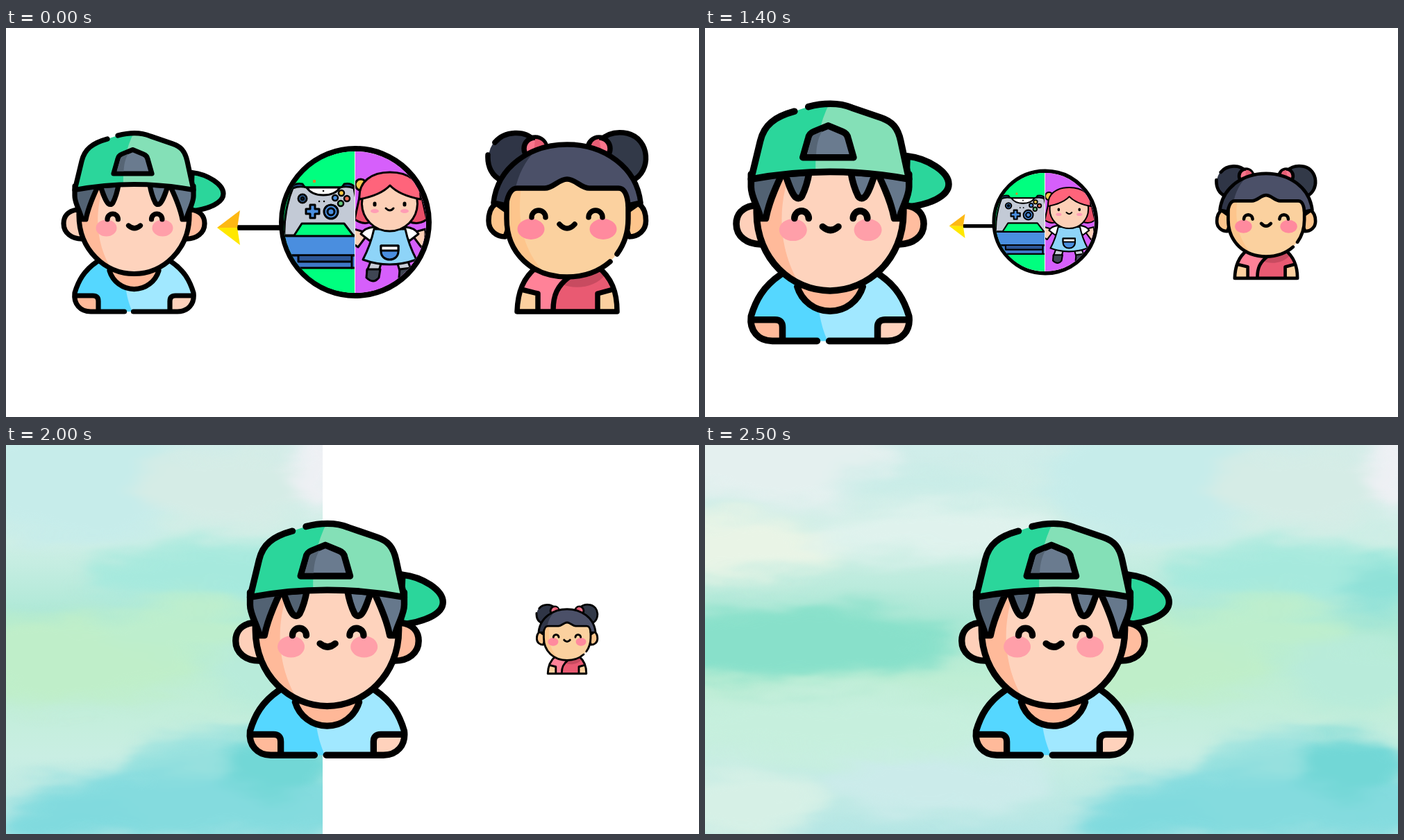
These frames come from a looping animation (998 by 561 pixels, 3 s). An HTML page:

```html
<!DOCTYPE html>
<html lang="en">
<head>
<meta charset="utf-8">
<title>Toy choice</title>
<style>
  html, body { margin: 0; height: 100%; overflow: hidden; background: #fff; }
  svg { display: block; width: 100vw; height: 100vh; }
  .art { stroke: #000; stroke-linecap: round; stroke-linejoin: round; }
  .flat { stroke: none; }
  .line { fill: none; }
</style>
</head>
<body>
<svg viewBox="0 0 998 561">
  <defs>
    <linearGradient id="wash" x2="0" y2="1">
      <stop offset="0" stop-color="#d0edea"/>
      <stop offset=".25" stop-color="#cfefe6"/>
      <stop offset=".45" stop-color="#abe8d5"/>
      <stop offset=".6" stop-color="#beeed4"/>
      <stop offset=".8" stop-color="#c9eee3"/>
      <stop offset="1" stop-color="#b4e6e5"/>
    </linearGradient>
    <filter id="watery" filterUnits="userSpaceOnUse" x="-80" y="-80" width="1158" height="721" color-interpolation-filters="sRGB">
      <feGaussianBlur stdDeviation="13" result="soft"/>
      <feTurbulence type="fractalNoise" baseFrequency=".008 .025" numOctaves="3" seed="4"/>
      <feDisplacementMap in="soft" scale="50" xChannelSelector="R" yChannelSelector="G"/>
    </filter>
    <clipPath id="stage"><path d="M0 0H998V561H0Z"/></clipPath>
    <clipPath id="boyFace"><path d="M105 228V270C105 320 143 354.500 184.500 354.500S264 320 264 270V228Z"/></clipPath>
    <clipPath id="girlFace"><path d="M721 212V275C721 325 758 359 808 359S896 325 896 275V212Z"/></clipPath>
    <clipPath id="girlHair"><path d="M702 252C708 200 755 168 808 168S908 200 914 252L896 256Q894 231 882 231H840C828 231 820 218 808 218S788 231 776 231H736Q724 231 720 256Z"/></clipPath>
    <clipPath id="leftHalf"><path d="M502 178A102 102 0 0 0 502 382Z"/></clipPath>
    <clipPath id="rightHalf"><path d="M503 178A102 102 0 0 1 503 382Z"/></clipPath>
  </defs>

  <g id="girl" class="art" stroke-width="7.500">
    <path id="girlEar" fill="#fdc58c" d="M706 253C698 258 695 268 695 278C695 292 706 301 719 301L730 270Z"/>
    <use href="#girlEar" transform="matrix(-1 0 0 1 1616.500 0)"/>
    <circle class="flat" fill="#2f3546" cx="731" cy="187" r="36"/>
    <path class="line" d="M704 165C718 148 748 147 760 162M694 183C693 200 700 214 714 220"/>
    <path fill="#323948" d="M902 220C930 207 928 160 895 152C880 149 866 152 856 162L870 200Z"/>
    <g fill="#f9758c">
      <circle cx="762" cy="174" r="16"/>
      <circle cx="854" cy="174" r="16"/>
    </g>
    <path class="flat" fill="#e75e75" d="M762 160C774 160 778 170 776 176L760 180ZM854 160C842 162 842 170 843 180H858Z"/>
    <path class="flat" fill="#fcd09f" d="M765 344C745 360 737 380 736 409H880C880 380 872 360 852 344Z"/>
    <path class="flat" fill="#ff8298" d="M765 344C751 354 744 364 741 376L766 383V409H790C789 385 793 372 812 358Z"/>
    <path class="flat" fill="#e95a72" d="M812 358C793 372 788 385 788 409H852V383L875 376C870 360 864 352 852 344Z"/>
    <path class="flat" fill="#c84b60" d="M798 369C820 378 848 375 864 355L850 344L812 355Z"/>
    <path class="line" d="M765 344C745 360 737 380 736 409H880C880 380 872 360 852 344M742 377L766 383V407M874 377L852 383V407M811 359C794 372 788 385 788 407"/>
    <g class="flat" clip-path="url(#girlFace)">
      <path fill="#fbd19f" d="M715 210H900V365H715Z"/>
      <path fill="#fdc58c" d="M715 220H743C736 270 738 318 786 365H715Z"/>
    </g>
    <path class="line" d="M721 250V275C721 325 758 359 808 359C832 359 854 351 870 337M896 250V275C896 294 891 311 880 326"/>
    <g class="flat" clip-path="url(#girlHair)">
      <path fill="#4b5068" d="M700 160H920V260H700Z"/>
      <path fill="#303648" d="M700 160H784C757 176 739 202 733 235L722 260H700Z"/>
    </g>
    <path class="line" d="M702 252C708 200 755 168 808 168S908 200 914 252L896 256Q894 231 882 231H840C828 231 820 218 808 218S788 231 776 231H736Q724 231 720 256Z"/>
    <g class="flat" fill="#ff8a9e">
      <ellipse cx="756" cy="290" rx="19.500" ry="15"/>
      <ellipse cx="860" cy="290" rx="19.500" ry="15"/>
    </g>
    <path class="line" d="M757 273a10 10 0 0 1 20 0M839 273a10 10 0 0 1 20 0M797 283Q808 295 819 283"/>
  </g>

  <g id="toys" class="art" stroke-width="3">
    <path d="M334 288H396" stroke-width="7.500"/>
    <path class="flat" fill="#fdb813" d="M304 288L337 263L333 288.500Z"/>
    <path class="flat" fill="#ffe800" d="M304 288L337 313L333 288Z"/>
    <circle cx="503" cy="280" r="106" fill="#fff" stroke-width="8"/>
    <g clip-path="url(#leftHalf)">
      <path class="flat" fill="#00ff7f" d="M395 170H502V390H395Z"/>
      <path class="flat" fill="#d8862a" d="M442 219h4v4h-4z"/>
      <path fill="#4a8edf" d="M395 300H510V328H395Z"/>
      <path fill="#3f78c8" d="M395 328H510V346H395Z"/>
      <path fill="#2d5697" d="M421 329V337H498V329M498 337V346"/>
      <path fill="#2f5da8" d="M408 238Q411 222 427 225L432 232ZM482 232L487 225Q502 222 506 238Z"/>
      <path fill="#c3cad6" d="M413 231Q423 227 433 230H481Q491 227 501 231L514 299H500L487 282H426L415 299H401C400 277 405 250 413 231Z"/>
      <path fill="#fff" d="M433 230H481Q474 241 457 241T433 230Z"/>
      <g fill="#4a8edf">
        <circle cx="427" cy="246" r="6"/><circle cx="427" cy="246" r="2"/>
        <path d="M438 255h7v6h6v7h-6v6h-7v-6h-6v-7h6z"/>
        <circle cx="468" cy="265" r="10"/><circle cx="468" cy="265" r="5"/>
      </g>
      <g stroke-width="2.500">
        <circle cx="483" cy="238" r="4" fill="#f8c943"/>
        <circle cx="474" cy="245" r="4" fill="#4a8edf"/>
        <circle cx="491" cy="246" r="4" fill="#e96b57"/>
        <circle cx="482" cy="253" r="4" fill="#64c67a"/>
        <path d="M451 250h.1M458 250h.1M457 235h.1"/>
      </g>
    </g>
    <g clip-path="url(#rightHalf)">
      <path class="flat" fill="#d65ffb" d="M503 170H615V390H503Z"/>
      <circle cx="511" cy="226" r="8" fill="#f8c94d"/>
      <path fill="#e94f68" d="M509 244L502 276Q516 285 526 279H580Q594 285 606 276L598 240Z"/>
      <path fill="#c9ced8" d="M525 337L520 350H537L541 337ZM563 337L567 350H584L579 337Z"/>
      <path fill="#3f4653" d="M520 348L519 360Q529 370 537 360L539 348ZM567 348L566 360Q580 368 592 357L583 346Z"/>
      <g fill="#fdd0b7">
        <path id="dollHand" d="M512 293L501 290V312L507 316L519 300Z"/>
        <use href="#dollHand" transform="matrix(-1 0 0 1 1105 0)"/>
      </g>
      <path fill="#fff" d="M530 287Q516 288 511 297L524 307L535 295ZM575 287Q589 288 594 297L581 307L570 295Z"/>
      <path fill="#8ed4f8" d="M530 290H575Q580 313 591 334Q552 348 514 334Q525 313 530 290Z"/>
      <path fill="#4a8edf" d="M540 314H565V322C565 338 540 338 540 322Z"/>
      <path fill="#fff" d="M540 314H565V321H540Z"/>
      <circle cx="552.500" cy="253" r="40" fill="#fdd0b7"/>
      <path fill="#ff647b" d="M509 247C507 221 527 208 553 208S599 221 597 247Q566 241 553 227Q540 241 509 247Z"/>
      <g class="flat" fill="#ff9db5"><ellipse cx="531" cy="264" rx="6" ry="3"/><ellipse cx="574" cy="264" rx="6" ry="3"/></g>
      <path d="M531 253v2M574 253v2" stroke-width="5"/>
      <path class="line" d="M547 260Q553 266 558 260"/>
    </g>
  </g>

  <g id="backdrop" clip-path="url(#stage)">
    <path fill="url(#wash)" d="M0 0H998V561H0Z"/>
    <g id="blots" filter="url(#watery)"></g>
  </g>

  <g id="boy" class="art" stroke-width="7.200">
    <path fill="#2bd69b" d="M268 208.500C291 211 313 226 313 239C313 252 292 261.500 266 264Z"/>
    <path id="boyEar" fill="#fed0ba" d="M102 262C89 264 83 272 83 282C83 295 94 305 112 304L116 270Z"/>
    <path fill="#ffbd9f" transform="matrix(-1 0 0 1 369 0)" d="M102 262C89 264 83 272 83 282C83 295 94 305 112 304L116 270Z"/>
    <path class="flat" fill="#55d7ff" d="M131 337C112 350 104 365 99 382C97 398 107 409 122 409H200V337Z"/>
    <path class="flat" fill="#a1e8ff" d="M170 337C170 370 174 392 182 409H247C262 409 272 398 270 382C265 365 257 350 238 337Z"/>
    <path class="flat" fill="#ffba9a" d="M99 386H125Q133 386 133 394V409H122C107 409 97 400 99 386Z"/>
    <path class="flat" fill="#ffd2bc" d="M270 386H244Q236 386 236 394V409H247C262 409 272 400 270 386Z"/>
    <g class="line">
      <path d="M131 337C112 350 104 365 99 382C97 398 107 409 122 409H170.500M99 386H125Q133 386 133 394V409"/>
      <path d="M238 337C257 350 265 365 270 382C272 398 262 409 247 409H183.500M270 386H244Q236 386 236 394V409"/>
    </g>
    <path fill="#ffb898" d="M149 350A37 37 0 0 0 220 350"/>
    <g class="flat" clip-path="url(#boyFace)">
      <path fill="#fed3bd" d="M100 225H270V360H100Z"/>
      <path fill="#ffba9a" d="M100 225H142C126 265 128 318 160 360H100Z"/>
    </g>
    <path class="line" d="M105 240V270C105 320 143 354.500 184.500 354.500S264 320 264 270V240"/>
    <g id="locks">
      <path d="M99 228V242C99 253 106 262 109.500 276H115C118 260 124 246 132 229Z"/>
      <path d="M136 228C140 240 143 249 147 253Q151 256 154 252C158 244 160 238 162 226Z"/>
    </g>
    <path class="flat" fill="#2bd69b" d="M146 160C124 166 113 175 109 192L99 233.500Q184.500 217.500 270 233.500L200 152Q176 151 161 155Z"/>
    <path class="flat" fill="#84e0b7" d="M184 151C172 175 168 200 169 226Q220 224 270 233.500L261 192C258 178 252 171 240 167L208 156C200 152 192 151 184 151Z"/>
    <path class="line" d="M146 160C124 166 113 175 109 192L99 233.500Q184.500 217.500 270 233.500L261 192C258 178 252 171 240 167L208 156C194 150 176 151 161 155"/>
    <path fill="#6a7b8f" d="M155 210L161 189Q162 184 167 182L182.500 175.500L198 182Q203 184 204 189L210 210Z"/>
    <path class="flat" fill="#566575" d="M159.500 206.500L164.500 189Q165 186 168 185L176 181.500C171 190 170 198 169.500 206.500Z"/>
    <g class="flat" fill="#ff9fa9">
      <ellipse cx="144.500" cy="288.500" rx="15" ry="12"/>
      <ellipse cx="225.500" cy="288.500" rx="15" ry="12"/>
    </g>
    <path class="line" d="M146 276a7.700 8 0 0 1 15.400 0M209.500 276a7.700 8 0 0 1 15.400 0M176.500 285Q185 292.500 193.500 285"/>
  </g>
</svg>
<script>
const el = id => document.getElementById(id);

// The right-hand locks mirror the left ones in a lighter colour
const locks = el('locks'), mirrored = locks.cloneNode(true);
mirrored.removeAttribute('id');
mirrored.setAttribute('transform', 'matrix(-1 0 0 1 369 0)');
locks.setAttribute('fill', '#526273');
mirrored.setAttribute('fill', '#66788c');
locks.after(mirrored);

// Watercolour blots: x, y, rx, ry, colour
const blots = [
  [110, 25, 160, 65, '#e4f0ef'], [20, 150, 170, 45, '#e9f4e6'], [330, 125, 170, 40, '#dff2ed'],
  [310, 55, 130, 16, '#c8ece7'], [660, 50, 170, 90, '#c6ecea'], [860, 60, 130, 60, '#d5ece6'],
  [990, 30, 30, 75, '#eef0f4'], [860, 185, 210, 42, '#a6e9dd'], [970, 205, 60, 35, '#8fe1d8'],
  [130, 287, 230, 54, '#88e0ca'], [640, 310, 170, 65, '#bfeec9'], [800, 265, 130, 40, '#bdeecd'],
  [930, 330, 100, 50, '#b8ebda'], [180, 405, 240, 45, '#c6efdd'], [330, 490, 170, 45, '#cbebea'],
  [60, 520, 110, 50, '#d6f0e6'], [850, 455, 130, 38, '#98e1de'], [810, 520, 270, 50, '#84dbde'],
  [630, 545, 100, 28, '#80dade'], [930, 460, 75, 48, '#72d7d6']
];
el('blots').innerHTML = blots.map(([x, y, rx, ry, fill]) =>
  `<ellipse cx="${x}" cy="${y}" rx="${rx}" ry="${ry}" fill="${fill}"/>`).join('');

// Keys are [step, value] pairs
const girlSize = [[0, 1], [1, .89], [3, .745], [5, .627], [6, .576], [9, .432], [11, .386], [13, .314], [16, .24]];
const toysSize = [[0, 1], [1, .927], [5, .695], [9, .505], [16, .25]];
const boySize = [[0, 1], [1, 1.052], [3, 1.177], [5, 1.33], [6, 1.415], [9, 1.298], [16, 1.298]];
const boyX = [[0, 198], [6, 198], [9, 305], [11, 480], [13, 480], [16, 519]];
const backdropEdge = [[0, 0], [6, 0], [9, 281], [11, 456], [13, 684], [16, 998]];

function at(keys, step) {
  const i = Math.max(1, keys.findIndex(key => key[0] >= step));
  const [s0, v0] = keys[i - 1], [s1, v1] = keys[i];
  return v0 + (v1 - v0) * (step - s0) / (s1 - s0);
}

function place(id, x, y, size, pivotX = x) {
  el(id).setAttribute('transform', `translate(${x} ${y}) scale(${size}) translate(${-pivotX} ${-y})`);
}

let shown = -1;
function draw() {
  const time = performance.now() % 3000;
  const step = Math.min(16, Math.max(0, Math.floor(time / 100) - 9));
  if (step !== shown) {
    shown = step;
    place('girl', 808, 280, at(girlSize, step));
    place('toys', 460, 280, at(toysSize, step));
    place('boy', at(boyX, step), 280.5, at(boySize, step), 198);
    el('backdrop').setAttribute('transform', `translate(${at(backdropEdge, step) - 998})`);
  }
  requestAnimationFrame(draw);
}
draw();
</script>
</body>
</html>
```
